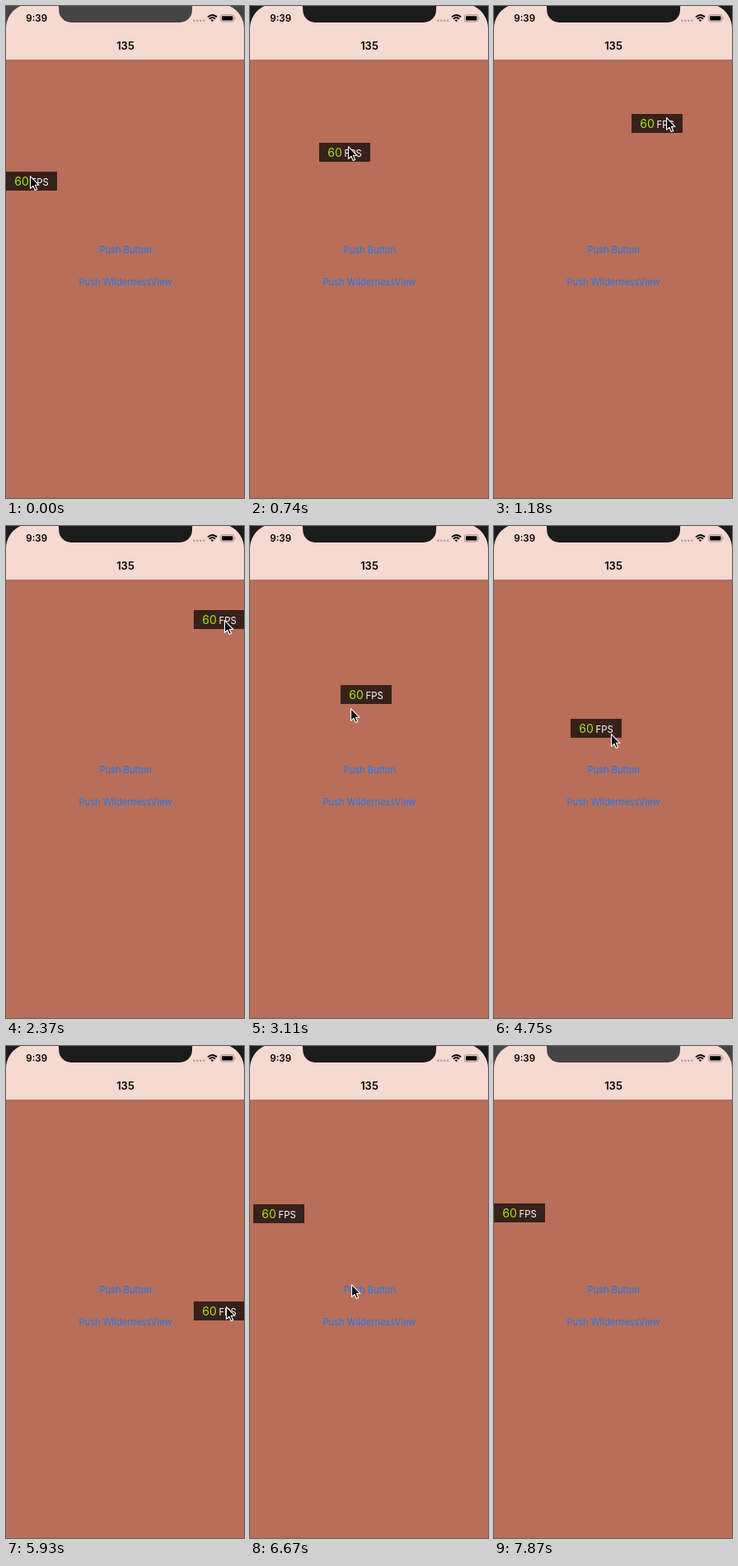
An HTML page for the animation above (7.97 s loop, 289 by 597 pixels).

```html
<!DOCTYPE html>
<html lang="en">
<head>
<meta charset="utf-8">
<title>Draggable FPS badge</title>
<style>
  html, body { margin: 0; width: 100%; height: 100%; overflow: hidden; background: #b86e59; }
  svg { display: block; width: 289px; height: 597px; }
  text { font-family: Inter, Roboto, "Liberation Sans", sans-serif; }
  .bold { font-weight: 600; fill: #000; }
  .link { font-size: 11.1px; fill: #1479f6; text-anchor: middle; }
</style>
</head>
<body>
<svg viewBox="0 0 289 597">
  <rect width="289" height="597" fill="#b86e59"/>
  <rect width="289" height="65" fill="#f6d9d1"/>

  <g id="bezel">
    <path d="M0 0H17.500A30 30 0 0 0 0 27Z"/>
    <path d="M289 0H271.500A30 30 0 0 1 289 27Z"/>
    <path d="M63.700 0Q64.200 1 64.200 2V5A15 15 0 0 0 79.200 20H211A15 15 0 0 0 226 5V2Q226 1 226.500 0Z"/>
  </g>

  <text class="bold" x="24.300" y="19.200" font-size="11.500">9:39</text>
  <text class="bold" x="145" y="52.700" font-size="13" text-anchor="middle">135</text>

  <path d="M228.500 17.700h12" stroke="#000" stroke-opacity=".28" stroke-width="2.500"
        stroke-linecap="round" stroke-dasharray="0 3.900"/>
  <g fill="none" stroke="#000" stroke-width="1.900">
    <path d="M245 13.400Q250.500 8.400 256 13.400"/>
    <path d="M247 15.700Q250.500 12.500 254 15.700"/>
  </g>
  <path d="M248.600 17.100Q250.500 15.700 252.400 17.100L250.500 19.200Z"/>
  <rect x="260.500" y="10.700" width="16.400" height="8.300" rx="2.300" fill="none" stroke="#000" stroke-opacity=".4" stroke-width=".8"/>
  <rect x="262" y="12.200" width="13.400" height="5.300" rx="1.100"/>
  <path d="M278 13.400Q279.300 14.800 278 16.300Z" fill-opacity=".45"/>

  <text class="link" x="145.300" y="300">Push Button</text>
  <text class="link" x="145" y="338.500">Push WildernessView</text>

  <g id="badge">
    <rect width="62" height="23" fill="#000" fill-opacity=".7"/>
    <text x="10.300" y="16.800" font-size="14" fill="#a8e60a">60</text>
    <text x="30.500" y="16.800" font-size="11.300" fill="#fff">FPS</text>
  </g>

  <path id="cursor" d="M.5 .7V15.400L3.900 12.300L6.200 17.500L8.700 16.400L6.400 11.300H11Z"
        fill="#0c0c0c" stroke="#fff" stroke-width="1.100" stroke-linejoin="round"/>
</svg>

<script>
  const LOOP = 7970, START = 289, STEP = 148.4;
  const WAKE = 300, SLEEP = 7870;
  const LAST_CURSOR = 46;
  const SETTLE = 0.4; // share of the distance left after each step

  // A move drags to `drop` between two steps, then settles at `rest`; `bend` curves the drag
  const badgeMoves = [
    { start: 0, end: 7, drop: [195, 119], rest: [228, 102] },
    { start: 15, end: 20, drop: [80.5, 216], rest: [0, 264] },
    { start: 28, end: 31, bend: [51, 180], drop: [158, 281], rest: [228, 310] },
    { start: 38, end: 39, drop: [165, 229], rest: [0, 191] }
  ];
  const cursorMoves = [
    { start: 0, end: 7, drop: [239, 123], rest: [265, 114] },
    { start: 15, end: 20, drop: [86, 248], rest: [28, 272] },
    { start: 28, end: 31, bend: [97, 194], drop: [215, 305], rest: [267, 316] },
    { start: 38, end: 39, drop: [158, 227], rest: [92, 204] },
    { start: 42, end: 46, drop: [215, 543], rest: [215, 543] }
  ];

  const [bezel, badge, cursor] = ["bezel", "badge", "cursor"].map(id => document.getElementById(id));
  const mix = (a, b, u) => a.map((v, i) => v + (b[i] - v) * u);

  function pointAt(home, moves, step) {
    let from = home;
    let move = null;
    for (const next of moves) {
      if (next.start > step) break;
      if (move) from = move.rest;
      move = next;
    }
    if (!move) return home;
    const { start, end, drop, rest } = move;
    if (step >= end) return mix(rest, drop, SETTLE ** (step - end));
    const u = (step - start) / (end - start);
    const bend = move.bend || mix(from, drop, 0.5);
    return mix(mix(from, bend, u), mix(bend, drop, u), u);
  }

  function place(el, point) {
    el.setAttribute("transform", `translate(${point.map(Math.round)})`);
  }

  // Positions advance in discrete steps, like the screen capture rate
  function draw(now) {
    const t = now % LOOP;
    const step = Math.floor((t - START) / STEP);
    bezel.setAttribute("fill", t < WAKE || t >= SLEEP ? "#444" : "#1c1c1c");
    place(badge, pointAt([0, 201], badgeMoves, step));
    place(cursor, pointAt([29, 206], cursorMoves, step));
    cursor.style.display = step > LAST_CURSOR ? "none" : "";
  }

  const origin = performance.now();
  function tick() {
    draw(performance.now() - origin);
    requestAnimationFrame(tick);
  }
  tick();
</script>
</body>
</html>
```
